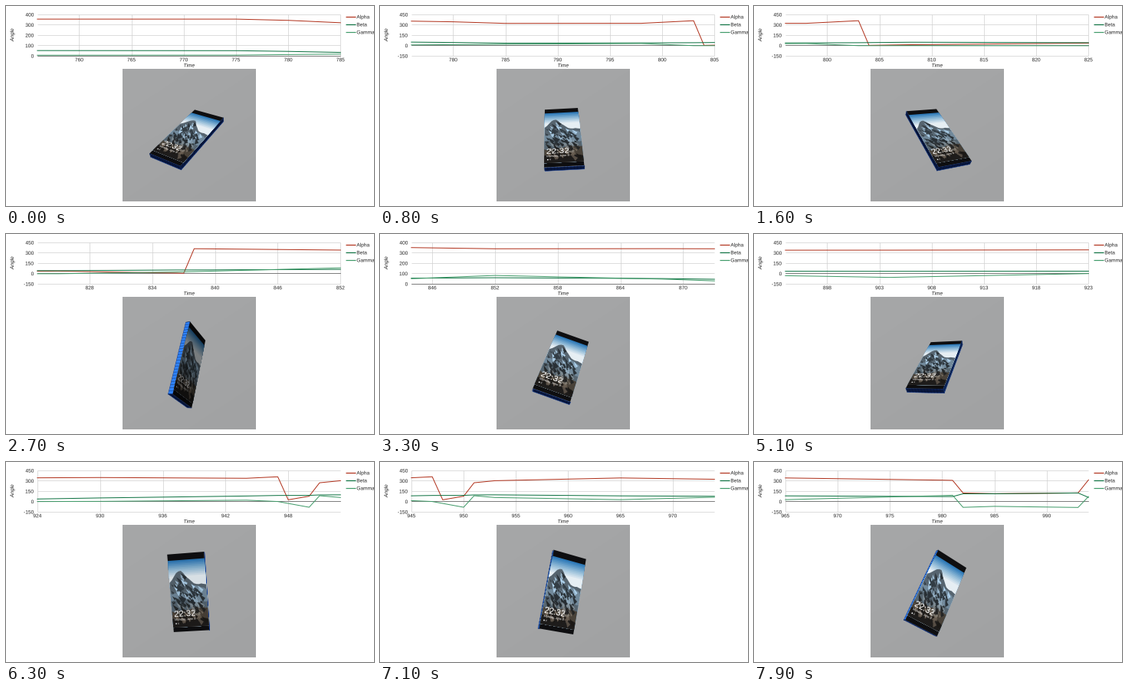
A matplotlib script that plays this animation: 480x261 px, repeating every 8000 ms.

```python
import numpy as np
import matplotlib
import matplotlib.pyplot as plt
from matplotlib.animation import FuncAnimation
from matplotlib.collections import LineCollection, PolyCollection
from matplotlib.colors import LinearSegmentedColormap, to_rgb
from matplotlib.patches import PathPatch
from matplotlib.path import Path
from matplotlib.textpath import TextPath
from matplotlib.transforms import Affine2D

matplotlib.rcParams["toolbar"] = "None"

WIDTH, HEIGHT, DPI, FRAMES = 480, 261, 100, 80
PX = 72 / DPI
LEFT, RIGHT, TOP, BOTTOM = 40.9, 436.3, 10.9, 64.9
SPAN = 29
FONT = 6.6

# Key poses: sample, then unwrapped alpha, beta, gamma in degrees
POSES = [
    (756, 354, 50, 5), (775, 354, 49, 6), (780, 342, 42, 11), (785, 319, 32, 16),
    (798, 320, 36, 27), (803, 358, 39, -4), (808, 370, 46, -4), (825, 393, 39, -5),
    (836, 365, 49, 20), (838, 358, 50, 26), (852, 338, 58, 80), (868, 339, 50, 45),
    (882, 336, 32, -4), (904, 337, 30, -58), (923, 341, 32, -3), (930, 346, 50, 0),
    (944, 335, 78, 18), (947, 357, 86, -2), (950, 435, 87, -85), (953, 480, 85, -124),
    (965, 520, 100, -155), (980, 488, 110, -96), (985, 472, 110, -72),
    (993, 482, 122, -88), (994, 492, 122, -110),
]
SERIES = [("Alpha", "#b0301a"), ("Beta", "#0b7140"), ("Gamma", "#3f9a68")]
NEWEST = ([0, 16, 27, 40, 51, 63, 79], [785, 825, 852, 897, 923, 953, 994])
# Tick rhythm: first frame, step, offset
TICKS = [(0, 5, 0), (22, 6, 0), (44, 5, 3), (56, 6, 0), (71, 5, 0)]

# Phone box and camera
W, L, T = 47, 102, 6.5
DIST, TILT = 360, np.radians(5)
CENTER = 238.3, 170.3
EYE = DIST * np.array([0, -np.cos(TILT), np.sin(TILT)])
LIGHT = np.array([0, -0.8, 0.6])


def readings(samples):
    """Sensor angles: alpha wraps at 360, gamma folds at +-90."""
    keys, *tracks = np.array(POSES, float).T
    a, b, g = (np.interp(samples, keys, t) for t in tracks)
    fold = g < -90
    return np.array([(a + 180 * fold) % 360, np.where(fold, 180 - b, b),
                     g + 180 * fold])


def band(v0, v1):
    return [(0, v0), (1, v0), (1, v1), (0, v1)]


def wallpaper():
    """Shapes in screen coordinates, v downwards: sky, ridges, rock streaks."""
    rng = np.random.default_rng(7)
    sky = LinearSegmentedColormap.from_list("sky", ["#2f7ab8", "#8fb9d6", "#e6eef3"])
    land = LinearSegmentedColormap.from_list(
        "land", ["#56646f", "#71899b", "#566570", "#4a4239", "#1e1c1b"])

    def crest(u, base, rise, peak):
        return base - rise * np.exp(-((u - peak) / .25) ** 2)

    shapes = [(to_rgb("#0e0e10"), band(0, 1))]
    for t in np.linspace(0, 1, 10):
        shapes.append((sky(t)[:3], band(.08 + .2 * t, .94)))
    u = np.linspace(0, 1, 16)
    for k in range(5):
        base = .4 + .11 * k
        v = crest(u, base, .18 / (1 + k), .3 + .45 * (k % 2)) + rng.normal(0, .008, 16)
        shapes.append((land(k / 4)[:3], [*zip(u, v), (1, .94), (0, .94)]))
    for x, depth, size, tone in rng.random((150, 4)):
        x *= .82
        y0 = crest(x, .42, .18, .3)
        y = y0 + depth * (.86 - y0)
        d = .06 + .12 * size
        shade = np.array(land((y - .2) / .74)[:3]) * (.45 if tone < .5 else 1.1 + .6 * tone)
        shapes.append((np.clip(shade, 0, 1),
                       [(x, y), (x + d, y + .35 * d), (x + .6 * d, y + .6 * d)]))
    return shapes


def on_screen(uv):
    u, v = np.asarray(uv, float).T
    return np.column_stack([(u - .5) * W, (.5 - v) * L, np.full(len(u), T / 2)])


def glyphs(text, size, style="normal"):
    return TextPath((0, 0), text, size=size,
                    prop={"family": "Liberation Sans", "style": style})


def screen_label(text, size, u, v):
    path = glyphs(text, size)
    return on_screen(path.vertices * [1 / W, -1 / L] + [u, v]), path.codes


SCREEN = [(np.array(c), on_screen(p)) for c, p in wallpaper()]
LABELS = [screen_label("22:32", 11.4, .05, .8),
          screen_label("Monday, June 8", 3.9, .06, .85),
          screen_label("■ 4", 3.2, .07, .9)]


def side(axis, sign):
    """Outward normal, front and back rim of one narrow side."""
    half = np.array([W, L]) / 2
    other = 1 - axis
    ends = np.zeros((2, 3))
    ends[:, axis] = sign * half[axis]
    ends[:, other] = -half[other], half[other]
    normal = np.zeros(3)
    normal[axis] = sign
    return normal, ends + [0, 0, T / 2], ends - [0, 0, T / 2]


SIDES = [side(a, s) for a in (0, 1) for s in (-1, 1)]


def rotation(alpha, beta, gamma):
    a, b, g = np.radians([alpha, beta, gamma])
    ca, sa, cb, sb, cg, sg = (np.cos(a), np.sin(a), np.cos(b), np.sin(b),
                              np.cos(g), np.sin(g))
    rz = np.array([[ca, -sa, 0], [sa, ca, 0], [0, 0, 1]])
    rx = np.array([[1, 0, 0], [0, cb, -sb], [0, sb, cb]])
    ry = np.array([[cg, 0, sg], [0, 1, 0], [-sg, 0, cg]])
    return rz @ rx @ ry


def project(points, rot):
    x, y, z = rot @ np.asarray(points).T
    up = z * np.cos(TILT) + y * np.sin(TILT)
    k = DIST / (DIST + y * np.cos(TILT) - z * np.sin(TILT))
    return np.column_stack([CENTER[0] + x * k, CENTER[1] - up * k])


def mix(c0, c1, t):
    return np.array(to_rgb(c0)) * (1 - t) + np.array(to_rgb(c1)) * t


fig = plt.figure(figsize=(WIDTH / DPI, HEIGHT / DPI), dpi=DPI, facecolor="white")
ax = fig.add_axes([0, 0, 1, 1])
ax.axis("off")

ramp = np.add.outer(np.linspace(0, .6, 40), np.linspace(0, .4, 40))
gray = LinearSegmentedColormap.from_list("gray", ["#a6a7a8", "#a1a2a3"])
ax.imshow(ramp, cmap=gray, extent=(152, 326, 255, 82), aspect="auto",
          interpolation="bilinear", zorder=0)
ax.set(xlim=(0, WIDTH), ylim=(HEIGHT, 0))


def write(text, x, y, align=0, style="normal", angle=0):
    """Text on baseline y; align 0, .5 or 1 for left, centre or right."""
    path = glyphs(text, FONT, style)
    box = path.get_extents()
    move = (Affine2D().translate(-align * (box.x0 + box.x1), 0)
            .scale(1, -1).rotate_deg(angle).translate(x, y))
    return ax.add_patch(PathPatch(path.transformed(move), fc="#222", lw=0, zorder=4))


for n, (name, color) in enumerate(SERIES):
    y = 14 + 10 * n
    ax.plot([443, 455.5], [y, y], color=color, lw=1.2 * PX, solid_capstyle="butt")
    write(name, 457.3, y + 2.4)
write("Time", 239, 79.6, .5, "italic")
write("Angle", 10, 38, .5, "italic", -90)

live = []


def keep(artist):
    live.append(artist)
    return artist


def add(kind, shapes, **style):
    keep(ax.add_collection(kind(shapes, **style), autolim=False))


def draw_chart(i, end):
    start = end - SPAN
    samples = np.arange(start, end + 1)
    values = readings(samples)
    lo, hi = (-150, 450) if values.min() < 0 else (0, 400)

    def px(s):
        return LEFT + (s - start) / SPAN * (RIGHT - LEFT)

    def py(v):
        return BOTTOM - (v - lo) / (hi - lo) * (BOTTOM - TOP)

    _, step, offset = [t for t in TICKS if t[0] <= i][-1]
    grid = []
    for s in samples[samples % step == offset]:
        grid.append([(px(s), TOP), (px(s), BOTTOM)])
        keep(write(str(s), px(s), 72.3, .5))
    for v in np.linspace(lo, hi, 5):
        grid.append([(LEFT, py(v)), (RIGHT, py(v))])
        keep(write(f"{v:.0f}", 36.3, py(v) + 2.7, 1 if v else .5 + .5))
    add(LineCollection, grid, colors="#cfcfcf", lw=.7 * PX, zorder=1)
    keep(ax.plot([LEFT, RIGHT], [py(0)] * 2, color="#555", lw=.7 * PX, zorder=2)[0])
    for (_, color), vals in zip(SERIES, values):
        keep(ax.plot(px(samples), py(vals), color=color, lw=PX, zorder=3)[0])


def draw_phone(rot):
    polys, colors, ribs = [], [], []
    for normal, front, back in SIDES:
        n = rot @ normal
        center = rot @ ((front + back).mean(axis=0) / 2)
        if n @ (EYE - center) <= 0:
            continue
        polys.append(project([*front, *back[::-1]], rot))
        colors.append(mix("#08173f", "#2f82f8", np.clip(.1 + 2 * n[2], 0, 1)))
        for t in np.linspace(0, 1, 26 if normal[0] else 13):
            rib = [rim[0] + t * (rim[1] - rim[0]) for rim in (front, back)]
            ribs.append(project(rib, rot))
    add(PolyCollection, polys, facecolors=colors, edgecolors="#143f9c", lw=.5 * PX, zorder=5)
    add(LineCollection, ribs, colors="#050b1c", lw=.7 * PX, alpha=.45, zorder=6)

    face = rot[:, 2]
    if face @ (EYE - face * T / 2) <= 0:
        back = on_screen(band(0, 1)) - [0, 0, T]
        add(PolyCollection, [project(back, rot)], facecolors="#14181f", zorder=7)
        return
    glow = np.clip(1.35 * (face @ LIGHT) - .1, .15, 1)
    add(PolyCollection, [project(p, rot) for _, p in SCREEN],
        facecolors=[c * glow for c, _ in SCREEN], lw=0, zorder=7)
    for pts, codes in LABELS:
        keep(ax.add_patch(PathPatch(Path(project(pts, rot), codes), lw=0,
                                    fc=(glow,) * 3, zorder=8)))


def draw(i):
    while live:
        live.pop().remove()
    end = int(round(np.interp(i, *NEWEST)))
    draw_chart(i, end)
    draw_phone(rotation(*readings(end)))
    return []


anim = FuncAnimation(fig, draw, frames=FRAMES, interval=100, init_func=lambda: [],
                     repeat=True, repeat_delay=0, blit=False)
plt.show()
```
